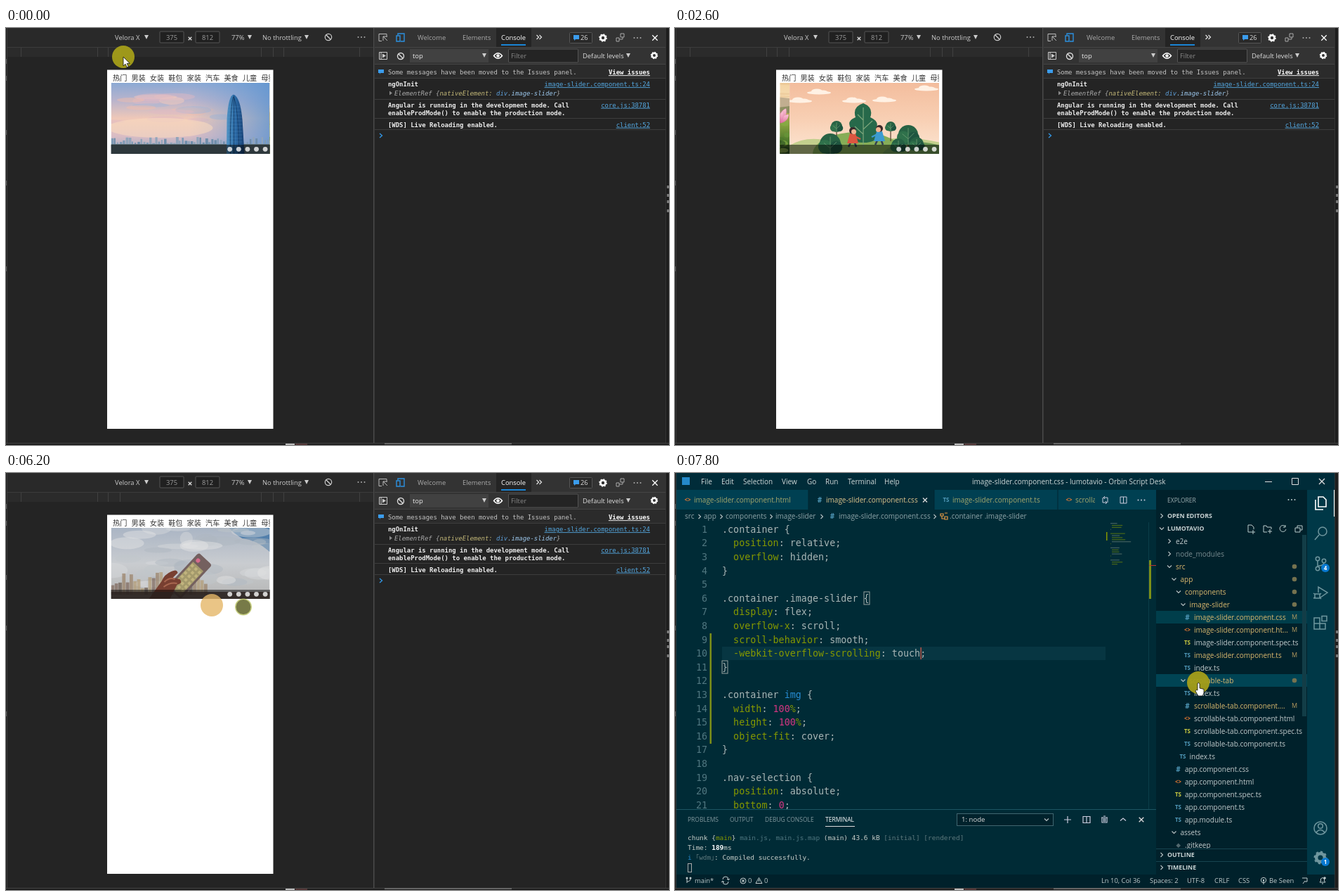
Write an HTML page that moves like this. It is 944 px wide and 593 px high and loops after 8 s.

```html
<!DOCTYPE html>
<html lang="en">
<head>
<meta charset="utf-8">
<title>Image slider</title>
<style>
html, body { margin: 0; width: 100%; height: 100%; overflow: hidden; background: #242424; }
svg { display: block; }
text { font-family: "Open Sans", "Noto Sans", sans-serif; white-space: pre; }
.mono { font-family: "DejaVu Sans Mono", monospace; }
.cjk { font-family: "Noto Sans CJK SC", "Noto Sans CJK", sans-serif; }
.b { font-weight: bold; }
.i { font-style: italic; }
.u { text-decoration: underline; }
.end { text-anchor: end; }
.mid { text-anchor: middle; }
</style>
</head>
<body>
<svg id="stage" width="944" height="593" viewBox="0 0 944 593"></svg>
<script>
const rect = (x, y, w, h, fill, more = '') => `<rect x="${x}" y="${y}" width="${w}" height="${h}" fill="${fill}" ${more}/>`;
const disc = (x, y, r, fill, more = '') => `<circle cx="${x}" cy="${y}" r="${r}" fill="${fill}" ${more}/>`;
const oval = (x, y, rx, ry, fill, more = '') => `<ellipse cx="${x}" cy="${y}" rx="${rx}" ry="${ry}" fill="${fill}" ${more}/>`;
const shape = (d, fill, more = '') => `<path d="${d}" fill="${fill}" ${more}/>`;
const line = (d, stroke = '#ccc', w = 1) => `<path d="${d}" fill="none" stroke="${stroke}" stroke-width="${w}"/>`;
const at = (x, y, body) => `<g transform="translate(${x} ${y})">${body}</g>`;
const span = (s, fill) => `<tspan fill="${fill}">${s}</tspan>`;
// y is the middle of the line of text
const text = (x, y, s, fill = '#ccc', size = 9.4, cls = '') =>
  `<text x="${x}" y="${y + size * .36}" fill="${fill}" font-size="${size}" class="${cls}">${s}</text>`;
const grad = (id, stops, dir = 'x2="0" y2="1"') => `<linearGradient id="${id}" ${dir}>` +
  stops.map((c, i) => `<stop offset="${i / (stops.length - 1)}" stop-color="${c}"/>`).join('') + '</linearGradient>';
const glow = (id, color) => `<radialGradient id="${id}"><stop stop-color="${color}"/><stop offset="1" stop-color="${color}" stop-opacity="0"/></radialGradient>`;
const many = (n, f) => Array.from({ length: n }, (_, i) => f(i)).join('');
const drop = (x, y, c = '#ccc') => shape(`M${x - 3} ${y - 3}h6l-3 6z`, c);
const cross = (x, y, r = 4, c = '#ddd') => line(`M${x - r} ${y - r}l${2 * r} ${2 * r}m0 ${-2 * r}l${-2 * r} ${2 * r}`, c, 1.3);
const gear = (x, y, r, c) => disc(x, y, r * .65, 'none', `stroke="${c}" stroke-width="${r * .5}"`) +
  disc(x, y, r * .9, 'none', `stroke="${c}" stroke-width="${r * .3}" stroke-dasharray="${r * .35}"`);
const dots3 = (x, y, c) => [-4.5, 0, 4.5].map(d => disc(x + d, y, 1, c)).join('');

let seed = 7;
const rnd = (a = 1, b = 0) => (seed = (seed * 16807) % 2147483647, b + (a - b) * seed / 2147483647);
const pick = list => list[Math.floor(rnd(list.length))];

// ---------- slides, each 226 x 101 ----------
const W = 226, H = 101;
const defs = '<defs><clipPath id="view"><path d="M149.500 78H376V179H149.500z"/></clipPath>' +
  '<clipPath id="phone"><path d="M145 60H376V179H145z"/></clipPath>' +
  `<clipPath id="slide"><path d="M0 0H${W}V${H}H0z"/></clipPath>` +
  grad('dusk', ['#8ba9d4', '#b9b4cc', '#efc8b8', '#d9bcc4', '#98abc6']) +
  grad('dayside', ['#6e9fd800', '#6e9fd800', '#5d94d0cc'], '') +
  grad('glass', ['#4f93c4', '#2a69a5', '#173f73'], '') +
  grad('dawn', ['#f3d3a2', '#fbe9c8', '#f3cf9c']) +
  grad('field', ['#b3a95a', '#7f9c3c', '#4f7a2c', '#2f5222']) +
  grad('petal', ['#f9c6d6', '#ee9cbc', '#d9689a']) +
  grad('peach', ['#f3bd9d', '#f8cfb3', '#fce6d3']) +
  grad('leaf', ['#4a8f22', '#63a52f', '#5f9f3c', '#6fa860']) +
  grad('cloud', ['#aab5c4', '#c9ccd0', '#b5b5b4']) +
  glow('sun', '#fffaf0') + glow('mist', '#dff7ea') + '</defs>';

const cloud = (x, y, c) => oval(x, y, 17, 2.5, c) + oval(x - 3, y - 2, 8, 3.5, c) + oval(x + 6, y - 1, 6, 2.5, c);

const city = rect(0, 0, W, H, 'url(#dusk)') +
  many(16, () => oval(rnd(170), rnd(60), rnd(34, 14), rnd(6, 2), pick(['#f6cdbb', '#f4bda9', '#dfb9c4', '#a4b5d5']), 'opacity=".45"')) +
  rect(0, 0, W, H, 'url(#dayside)') + oval(70, 64, 75, 14, '#fbdcc0', 'opacity=".55"') +
  many(54, i => { const h = rnd(11, 2); return rect(i * 4.2, 88 - h, rnd(4, 2), h + 4, pick(['#7f9bb6', '#6f8eab', '#91a5bb'])); }) +
  rect(0, 87, W, 14, '#5c7079') +
  shape('M164.500 101L165 52Q167 18 174.500 16.500Q184 20 187 52L190 101Z', 'url(#glass)') +
  line('M170 101Q169 42 174 20M175 101V18M182 101Q182 42 175 20', '#12355d', .8) +
  many(13, i => line(`M166 ${34 + i * 5}h21`, '#6aa6cf66', .6));

const bloom = ['M128 85C108 60 112 35 133 20C152 34 160 58 146 85Z',
  'M130 90C100 80 90 58 97 36C116 40 132 60 136 88Z',
  'M142 90C150 55 162 38 180 32C186 55 178 78 150 94Z',
  'M134 101C104 100 82 80 79 58C103 58 124 74 136 98Z',
  'M140 101C152 74 172 60 193 60C192 84 172 100 150 101Z',
  'M136 101C112 92 104 68 110 44C128 56 140 78 138 101Z',
  'M140 101C138 76 148 56 166 44C174 70 164 92 146 101Z']
  .map(d => shape(d, 'url(#petal)', 'stroke="#d9719f" stroke-width=".6"')).join('') +
  shape('M123 101Q130 78 137 70Q145 80 147 101Z', '#6f2b3c');
const lotus = rect(0, 0, W, H, 'url(#dawn)') + oval(78, 16, 95, 24, 'url(#sun)') +
  many(12, () => oval(rnd(W), rnd(20), rnd(30, 12), rnd(3, 1), '#e3b888', 'opacity=".4"')) +
  shape('M0 36Q30 28 62 33T126 26T226 22V60H0Z', '#c1ae90') + shape('M0 41Q50 35 100 39T226 33V101H0Z', '#8e8f63') +
  rect(0, 43, W, 58, 'url(#field)') + oval(35, 43, 55, 14, '#f0c164', 'opacity=".5"') +
  many(170, () => oval(rnd(W), rnd(H, 50), rnd(9, 2), rnd(5, 1.5), pick(['#84b043', '#4a7a2a', '#a9c75c', '#2c5022', '#68983a']), 'opacity=".65"')) +
  [[20, 47], [47, 43], [72, 51], [30, 62], [60, 70]].map(([x, y]) => oval(x, y, 5, 5, '#dc8eaa') + oval(x - 2, y, 2.5, 4, '#f2bccd')).join('') +
  at(167, 27, `<g transform="scale(.3)">${bloom}</g>`) + bloom;

const tree = (x, y, r, h) => line(`M${x} ${y}V${y + h}`, '#5e4936', Math.max(1.3, r / 8)) +
  disc(x, y, r, '#276244') + disc(x - r * .5, y + r * .25, r * .65, '#2f714b') + disc(x + r * .55, y + r * .3, r * .6, '#1f5540') +
  line(`M${x} ${y + r}V${y - r * .7}M${x - r * .6} ${y - r * .1}L${x} ${y + r * .4}L${x + r * .6} ${y - r * .2}`, '#78a57a', .7);
const child = (x, y, c, face) => line(`M${x - 2} ${y + 14}l-4 8m8-8l3 8`, '#344154', 2.6) +
  shape(`M${x - 4} ${y + 3}L${x + 4} ${y + 3}L${x + 8} ${y + 17}H${x - 8}Z`, c) +
  line(`M${x + face * 3} ${y + 7}l${face * 8} 4`, c, 2.4) +
  disc(x, y - 1, 5, '#3b2b2b') + disc(x + face * 1.5, y + .5, 3.5, '#f1b491');
const cartoon = rect(0, 0, W, H, 'url(#peach)') +
  [[42, 14], [92, 26], [195, 9], [135, 25], [15, 26]].map(([x, y]) => cloud(x, y, '#fff1e4')).join('') +
  shape('M0 89Q25 74 58 83T130 82T226 88V101H0Z', '#c3cf8d') +
  oval(98, 101, 65, 31, '#86ad57') + oval(181, 106, 50, 22, '#6e9b56') +
  tree(67, 62, 8, 22) + tree(144, 62, 7, 21) +
  shape('M105 29Q89 34 94 49Q80 54 88 66Q80 84 105 85Q130 85 123 66Q129 55 115 49Q120 35 105 29', '#27694a') +
  line('M105 92V35M105 73L93 62M105 66L118 54M105 53L97 45', '#7ba57a', 1.2) +
  tree(58, 87, 15, 15) + tree(169, 74, 14, 25) + tree(155, 89, 10, 10) + tree(181, 87, 10, 10) +
  child(90, 69, '#dd5640', 1) + child(128, 66, '#3c9bd1', -1);

const leaves = (n, low, colors, size) => many(n, () => oval(rnd(W), rnd(low), rnd(size, .8), rnd(size * .6, .6), pick(colors), 'opacity=".75"'));
const forest = rect(0, 0, W, H, 'url(#leaf)') +
  leaves(260, H, ['#2a5f16', '#3d8420', '#86bd35', '#b2dd55', '#1f4a14'], 6) +
  oval(130, 84, 85, 34, 'url(#mist)') + oval(150, 66, 60, 22, 'url(#mist)', 'opacity=".5"') +
  line('M8 101Q16 82 34 72T74 50T122 42T170 46T226 60', '#1d2a17', 4.5) +
  line('M0 46Q14 30 36 21T88 20T132 14T226 -4', '#1d2a17', 5) +
  line('M0 76Q22 58 46 48T84 21', '#1d2a17', 3.5) +
  line('M18 88Q52 70 88 68T150 62T226 82', '#33492a', 2.2) +
  line('M36 21Q62 36 82 33T128 42M92 20Q76 8 50 0M132 14Q160 26 184 24T226 34M122 42Q146 30 164 25M170 46Q190 38 226 46M0 12Q20 14 36 21M150 10Q168 4 176 -2', '#22331a', 2) +
  leaves(280, 62, ['#75b92d', '#a5d846', '#4b9322', '#2c6318'], 3.4);

const sky = rect(0, 0, W, H, 'url(#cloud)') + shape('M168 0H226V34Q207 17 187 15Q176 9 168 0', '#527fab') +
  many(36, () => oval(rnd(W), rnd(82), rnd(31, 8), rnd(11, 3), pick(['#d8dadb', '#aeb5bf', '#e4e5e4', '#bfc5ca']), 'opacity=".45"')) +
  many(26, i => { const h = rnd(32, 9); return rect(i * 5.3, 95 - h, 4.8, h, pick(['#9a8065', '#7e6659', '#b29a72', '#6b5a4d']), 'opacity=".7"'); }) +
  `<g transform="translate(114 66) rotate(43)">${rect(-13, -30, 26, 66, '#74605f', 'rx="4"') + rect(-10, -15, 20, 48, '#a49a6c')}` +
  many(18, i => rect(-9 + i % 3 * 7, -12 + Math.floor(i / 3) * 7, 4, 4, '#d6c78b', 'opacity=".6"')) + disc(-6, -21, 3, '#d66b8c') + '</g>' +
  shape('M54 101L72 76Q76 66 86 62Q94 58 95 64L88 71L98 73Q103 78 94 81L84 101Z', '#783f31') +
  line('M76 77Q83 70 91 73M75 84Q84 77 94 79', '#a96750', 2) +
  rect(0, 91, W, 10, '#55443e', 'opacity=".8"');

const slides = [city, lotus, cartoon, forest, sky].map((s, i) => at(i * W, 0, `<g clip-path="url(#slide)">${s}</g>`)).join('');

// ---------- browser with developer tools ----------
const dim = '#9c9c9c', blue = '#55a9e2';
const mono = (x, y, s, fill = '#d7d7d7', cls = '') => text(x, y, s, fill, 8.94, 'mono ' + cls);
const link = (y, s) => mono(917, y, s, blue, 'end u');
const field = (x, y, w, h, fill = '#202020') => rect(x, y, w, h, fill, 'stroke="#555" rx="1"');
const browser = rect(0, 0, 944, 593, '#242424') + rect(2, 0, 521, 27, '#292929') + rect(2, 28, 521, 13, '#2b2b2b') +
  line('M2 27.500H523', '#3c3c3c') + [21, 130, 145, 162, 363, 380, 395, 503].map(x => line(`M${x}.5 28V41`, '#414141')).join('') +
  text(155, 13.5, 'Velora X') + drop(200, 13) + field(219, 5, 34, 16) + text(236, 13.5, '375', dim, 9.4, 'mid') +
  cross(262, 15, 2.3) + field(270, 5, 34, 16) + text(287, 13.5, '812', dim, 9.4, 'mid') +
  text(321, 13.5, '77%') + drop(347, 13) + text(365, 13.5, 'No throttling') + drop(428, 13) +
  disc(459, 13, 4.7, 'none', 'stroke="#ccc" stroke-width="1.2"') + line('M455.500 9.500l7 7', '#ccc', 1.4) + dots3(506, 13, '#aaa') +
  rect(144, 59.5, 236.5, 510.5, '#fff') +
  `<g clip-path="url(#phone)">${['热门', '男装', '女装', '鞋包', '家装', '汽车', '美食', '儿童', '母婴'].map((s, i) => text(152 + i * 26.4, 71.5, s, '#333', 10.2, 'cjk')).join('')}</g>` +
  `<g clip-path="url(#view)"><g id="strip">${slides}</g>${rect(149, 166, 228, 13, '#000', 'opacity=".5"')}` +
  many(5, i => disc(318.7 + i * 12.6, 172.3, 3.4, '#fff', 'opacity=".78"')) + '</g>' +
  rect(523, 0, 1.5, 590, '#4a4a4a') + rect(525, 0, 414, 51, '#333') + rect(698, 0, 50, 27, '#242424') +
  line('M525 27.500H939M525 51.500H939', '#454545') + rect(705, 23, 35, 2, '#1a85d6') +
  line('M535 18.500h-4v-10h11v4M537 12l6 6m-6-6v6m0-6h6', '#bbb') +
  line('M558 10v-2h9v11h-5M556 11h5v8h-5z', '#2d91df', 1.4) +
  text(586, 13.5, 'Welcome', '#aaa') + text(650, 13.5, 'Elements', '#aaa') + text(705, 13.5, 'Console', '#fff') +
  line('M755.500 10l3 3-3 3m4-6l3 3-3 3', '#ddd', 1.3) +
  field(802.5, 6.5, 32, 15, '#292929') + shape('M808 10h8v6h-5l-2 2v-2h-1z', '#3b9cec') + text(818, 14, '26', '#ddd') +
  gear(850, 14, 5.5, '#fff') + line('M869 14h4v5h-4zM875 8h5v5h-5zM873 16h5v-3', '#aaa') + dots3(899, 14, '#aaa') + cross(924, 14, 3.7, '#fff') +
  line('M531.500 34.500h11v10h-11zM534 35v9', '#ccc') + shape('M536 36.500l5 3-5 3z', '#ccc') +
  disc(562, 40, 4.5, 'none', 'stroke="#ddd" stroke-width="1.4"') + line('M559 37l6 6', '#ddd', 1.4) +
  rect(575, 30, 112, 19, '#414141') + text(579, 40, 'top', '#eee') + drop(681, 39) +
  line('M694.500 39.500Q700.500 32 706.500 39.500Q700.500 47 694.500 39.500Z', '#fff', 1.4) + disc(700.5, 39.5, 2.3, '#fff') +
  field(715.5, 30, 99, 19, '#242424') + text(719, 40, 'Filter', '#888') + text(821, 40, 'Default levels', '#ddd') + drop(886, 39) + gear(923, 39, 5, '#fff') +
  [71, 101, 128, 144].map(y => line(`M525 ${y}.5H939`, '#3d3d3d')).join('') + rect(525, 52, 414, 19, '#2b2b2b') +
  shape('M530 59h8v5h-5l-1 2v-2h-2z', '#3b9cec') + mono(544, 63, 'Some messages have been moved to the Issues panel.', '#c4c4c4') + mono(917, 63, 'View issues', '#fff', 'end u b') +
  mono(544, 80, 'ngOnInit', '#eee', 'b') + link(80, 'image-slider.component.ts:24') +
  shape('M546 89.500l4 3-4 3z', '#888') +
  mono(553, 92.5, `ElementRef {${span('nativeElement:', '#c3b878')} ${span('div', '#5d9ed8')}${span('.image-slider', '#9cc8ed')}}`, '#aaa', 'i') +
  mono(544, 109.5, 'Angular is running in the development mode. Call', '#eee', 'b') + mono(544, 121, 'enableProdMode() to enable the production mode.', '#eee', 'b') + link(109.5, 'core.js:38781') +
  mono(544, 137.5, '[WDS] Live Reloading enabled.', '#eee', 'b') + link(137.5, 'client:52') +
  line('M532 150l3.500 3-3.500 3', '#3399e8', 1.3);

// ---------- code editor ----------
const olive = '#859900', pale = '#a8b5b5', amber = '#dcb96e';
const code = `.container {
  position: relative;
  overflow: hidden;
}

.container .image-slider {
  display: flex;
  overflow-x: scroll;
  scroll-behavior: smooth;
  -webkit-overflow-scrolling: touch;
}

.container img {
  width: 100%;
  height: 100%;
  object-fit: cover;
}

.nav-selection {
  position: absolute;
  bottom: 0;`.split('\n');
const paint = s => s.replace(/(^ +[\w-]+)|(\bimg\b)|(\d+)|%/g, (m, prop, tag, num) =>
  span(m, tag ? '#268bd2' : num ? '#d33682' : olive));
const codeRows = code.map((s, i) => {
  const y = 80 + i * 19.6;
  return text(46, y, i + 1, '#507780', 13.4, 'mono end') + text(67, y, paint(s), pale, 13.4, 'mono');
}).join('');
const minimap = code.map((s, i) => s && rect(620 + s.search(/\S/), 71 + i * 2.9, s.trim().length * .8, 1.2, i % 3 ? olive : '#7b8b80', 'opacity=".55"')).join('');

// depth, icon, name, mark
const files = `0 > e2e
0 > node_modules -
0 v src *
1 v app *
2 v components *
3 v image-slider *
4 # image-slider.component.css M
4 h image-slider.component.ht... M
4 s image-slider.component.spec.ts
4 t image-slider.component.ts M
4 t index.ts
3 v scrollable-tab *
4 t index.ts
4 # scrollable-tab.component.... M
4 h scrollable-tab.component.html
4 s scrollable-tab.component.spec.ts
4 t scrollable-tab.component.ts
3 t index.ts
2 # app.component.css
2 h app.component.html
2 s app.component.spec.ts
2 t app.component.ts
2 t app.module.ts
1 v assets
2 g .gitkeep`.split('\n');
const chevron = (x, y, open) => line(open ? `M${x - 3} ${y - 1.5}l3 3 3-3` : `M${x - 1.5} ${y - 3}l3 3-3 3`, '#b9c4c5', 1.1);
const icons = { '#': ['#', '#519aba'], h: ['&lt;&gt;', '#e37933'], s: ['TS', '#cbcb41'], t: ['TS', '#519aba'], g: ['◆', '#52686e'] };
const icon = (x, y, k) => text(x, y, ...icons[k], k === '#' ? 10 : 8, 'b mid');
const fileRows = files.map((row, i) => {
  const [depth, kind, name, mark] = row.split(' '), x = 713 + depth * 6.5, y = 97 + i * 18;
  const color = mark === '-' ? '#788b8f' : mark ? amber : '#c3cccd';
  return (icons[kind] ? icon(x - 9.5, y, kind) : chevron(x - 9, y, kind === 'v')) + text(x, y, name, color, 10) +
    (mark === 'M' ? text(882, y, 'M', '#b69b5f', 9, 'mid') : mark === '*' ? disc(882, y, 3.3, '#75724f') : '');
}).join('');
const section = (y, s, open) => chevron(693, y, open) + text(701, y, s, '#c8d2d3', 8.8, 'b');
const badge = (x, y, n) => disc(x, y, 6, '#0879d0') + text(x, y, n, '#fff', 8, 'b mid');
const ui = '#c0cbcc', idle = '#6f969e';
const ring = (x, y, r, c = idle, w = 1.5) => disc(x, y, r, 'none', `stroke="${c}" stroke-width="${w}"`);

const editor = rect(0, 0, 944, 593, '#002b36') + rect(0, 0, 940, 24, '#002c39') + rect(0, 24, 685, 28, '#004052') + rect(190, 24, 179, 28, '#002b37') +
  rect(10, 6, 11, 11, '#2489ca') +
  [[37, 'File'], [66, 'Edit'], [97, 'Selection'], [152, 'View'], [188, 'Go'], [214, 'Run'], [246, 'Terminal'], [298, 'Help']].map(([x, s]) => text(x, 12, s, '#d0d8d8', 10)).join('') +
  text(423, 12, 'image-slider.component.css - lumotavio - Orbin Script Desk', '#d0d8d8', 10) +
  line('M840 12.500h10M878.500 7.500h9v9h-9z', '#ddd') + cross(921, 12) +
  icon(18, 38, 'h') + text(27, 38.5, 'image-slider.component.html', '#a5a66c', 10) +
  icon(206, 38, '#') + text(215, 38.5, 'image-slider.component.css', '#e0c58c', 10) + cross(356, 38.5, 3) +
  icon(386, 38, 't') + text(395, 38.5, 'image-slider.component.ts', '#a5a66c', 10) +
  icon(561, 38, 'h') + text(570, 38.5, 'scrolla', '#a5a66c', 10) + rect(598, 24, 87, 28, '#004052') +
  line('M190 24V52M369 24V52M545 24V52', '#002530') +
  line('M609 35v7h6m-2-2l2 2-2 2M616 42v-7h-6m2-2l-2 2 2 2M634 34h9v9h-9zM638.500 34v9', '#ccd') + dots3(664, 38.5, '#ccd') +
  [[14, 'src'], [41, 'app'], [72, 'components'], [143, 'image-slider'], [233, 'image-slider.component.css'], [391, '.container .image-slider']].map(([x, s], i) =>
    text(x, 61.5, s, '#8fa4a8', 10) + (i ? chevron([35, 66, 137, 209, 370][i - 1], 62) : '')).join('') + icon(224, 61.5, '#') +
  line('M378 58h4v3h-4zM384 57h4M384 62h4v4h-4zM380 61v4h4', '#e69a45', 1.2) +
  rect(67, 247, 546, 19, '#073642') + rect(49.5, 228, 2.5, 157, '#7d9018') +
  rect(269, 169, 8, 18, 'none', 'stroke="#9aa3a0"') + rect(67, 267, 8, 18, 'none', 'stroke="#9aa3a0"') + codeRows + rect(349.5, 248, 1.3, 17, '#d35b4b') +
  minimap + rect(614, 84, 1.5, 12, olive) + rect(675, 124, 3, 55, '#7d9018') + rect(674, 131, 11, 1, '#b33') + line('M674.500 70V479', '#0b3d49') +
  // panel
  rect(0, 478, 685, 93, '#002b36') + line('M0 478.500H685', '#1c5563') +
  [[18, 'PROBLEMS'], [78, 'OUTPUT'], [128, 'DEBUG CONSOLE'], [214, 'TERMINAL']].map(([x, s], i) => text(x, 493, s, i > 2 ? '#fff' : '#82999f', 8.5)).join('') +
  rect(214, 502, 42, 1, '#ddd') + rect(401.5, 484.5, 137, 17, '#00222c', 'stroke="#426670"') + text(408, 493, '1: node', '#ddd', 9.6) + chevron(529, 493, true) +
  line('M554 493h10m-5-5v10M581 488.500h10v9h-10zM586 489v8M607 490h9m-8 0v7h7v-7m-5-2h3m-2.500 3v5m2 0v-5M634 494.500l4-3.500 4 3.500', '#ccd', 1.2) + cross(664, 493, 3.3) +
  text(18, 519, `chunk {${span('main', olive)}} ${span('main.js, main.js.map', '#4f7780')} (main) 43.6 kB ${span('[initial] [rendered]', '#5e797d')}`, '#c9cfca', 9.48, 'mono') +
  text(18, 533, `Time: <tspan class="b" fill="#fff">189</tspan>ms`, '#c9cfca', 9.48, 'mono') +
  text(18, 547, `${span('i', '#268bd2')} ${span('｢wdm｣', '#5e797d')}: Compiled successfully.`, '#c9cfca', 9.48, 'mono') + rect(18.5, 555.5, 5, 12, 'none', 'stroke="#aaa"') +
  // sidebar
  rect(685, 24, 215, 547, '#00212b') + text(701, 38.5, 'EXPLORER', '#9eafb2', 8.5) + dots3(878, 38, '#bcc') +
  rect(685, 196, 215, 18, '#003e4b') + '<g id="hover">' + rect(685, 286, 215, 18, '#004454') + '</g>' + rect(893, 88, 6, 258, '#123d47') +
  section(61, 'OPEN EDITORS') + section(79, 'LUMOTAVIO', true) +
  line('M816 74h5l3 3v3M816 74v10h4M823 81v6m-3-3h6M838 84v-9h4l1 2h6v3M838 84h5M847 80v6m-3-3h6M869 76a4.500 4.500 0 1 0 1 4m-1-6v3h-3M883 78h7v6h-7zM886 78v-3h7v6h-3', '#bcc') +
  fileRows + rect(685, 534, 215, 37, '#00212b') + line('M685 534.500H900M685 552.500H900', '#174450') + section(543, 'OUTLINE') + section(561, 'TIMELINE') +
  // activity bar
  rect(900, 24, 40, 547, '#003847') + rect(938, 24, 1.5, 38, '#fff') +
  line('M916 34h7l4 4v10h-11zM912 38v14h11', '#fff', 1.6) +
  line('M917 88l-6 7', idle, 1.6) + ring(922, 83, 6) +
  ring(915, 122, 2.7) + ring(915, 136, 2.7) + ring(924, 125, 2.7) + line('M915 125v8M924 128q-1 4-8 4', idle, 1.5) + badge(926, 135, 4) +
  line('M916 170v-8l13 8-10 7M911 172h7v6h-7zM909 171l3 2m-3 5l3-1m6-4l2-2m-2 6l2 2', idle, 1.5) +
  line('M910 206h8v16h-8zM918 214h8v8h-8M910 214h8M921 203.500h7v7h-7z', idle, 1.5) +
  ring(919, 505, 9) + ring(919, 502, 3.3) + line('M913 511q6-7 12 0', idle, 1.5) +
  gear(919, 547, 9, idle) + badge(926, 553, 1) +
  // status bar
  rect(0, 571, 940, 20, '#00212b') + line('M17 576v7M17 581q5 0 5-4', ui) + disc(17, 576, 1.5, ui) + disc(22, 576, 1.5, ui) + text(28, 580, 'main*', ui) +
  line('M68 578a4 4 0 0 1 8 0m-2-1l2 2 2-2M76 581a4 4 0 0 1-8 0m-2 1l2-2 2 2', ui) +
  ring(97, 580, 4, ui, 1) + cross(97, 580, 1.6, ui) + text(104, 580, '0', ui) + line('M119.500 575.500l4.500 8h-9zM119.500 578v3', ui) + text(127, 580, '0', ui) +
  [[607, 'Ln 10, Col 36'], [676, 'Spaces: 2'], [729, 'UTF-8'], [768, 'CRLF'], [802, 'CSS'], [846, 'Be Seen']].map(([x, s]) => text(x, 580, s, ui)).join('') +
  ring(838, 579, 3.7, ui, 1) + disc(838, 579, 1.2, ui) + line('M838 580v5M894 584l3-4m-4-4h7v5h-3M918 582h8l-1.500-2v-3q-2.500-3-5 0v3zM921 584h2', ui) + disc(925, 576, 1.8, ui);

const edges = rect(0, 0, 1.5, 593, '#1b1b1b') + line('M1.500 0V590', '#414141', .8) + rect(940, 0, 4, 593, '#1d1d1d') + line('M939.500 0V590', '#383838', .8) +
  [48, 72, 149, 221, 343].map(y => line(`M0 ${y - 4}v7`, '#777', 1.3)).join('') + [226, 238, 247, 260].map(y => rect(941, y - 2, 3, 4, '#777')).join('') +
  rect(0, 590, 944, 3, '#1d1d1d') + line('M0 590.500H944', '#444') + rect(398, 591, 13, 2, '#bbb') + rect(412, 591, 17, 2, '#503434') + rect(539, 590, 181, 2, '#656565');

// ---------- pointers ----------
const halo = disc(0, 0, 16, '#a49e19', 'opacity=".95"');
const outline = 'stroke="#111" stroke-width=".8"';
const arrow = halo + shape('M0 0V13L3 10.200L5.200 14.800L7.300 13.800L5.200 9.400H9.200Z', '#fff', outline);
const hand = halo + shape('M-1 1Q1 -1 2 2V8L8 9.500V15L6 19H0L-4 12Q-3 9 -1 11Z', '#fff', outline);
const touch = (gap = 3) => disc(0, 0, 16, '#e5b668', 'opacity=".8"') + disc(gap, 2.5, 12, '#b3bd58', 'opacity=".75"') + disc(gap, 2.5, 10.5, '#777a48');

const stage = document.getElementById('stage');
stage.innerHTML = defs + `<g id="browser">${browser}</g><g id="editor">${editor}</g>${edges}<g id="pointer"></g>`;
const el = Object.fromEntries(['strip', 'browser', 'editor', 'hover', 'pointer'].map(id => [id, document.getElementById(id)]));

// [time, slides scrolled]
const scrolls = [[0, 0], [600, .55], [800, .975], [1000, 1], [1200, 1.08], [1400, 1.3], [1600, 1.45], [2600, 1.94], [2800, 2],
  [3200, 2.2], [3400, 2.465], [4600, 2.8], [4800, 3], [5000, 3.07], [5200, 3.6], [5400, 4]];
// [time, look, x, y]
const pointers = [[0, arrow, 167, 41], [200, touch(), 357, 188], [400, ''], [3800, touch(), 331, 189], [4400, ''],
  [6200, touch(45), 293, 188], [6600, arrow, 928, 222], [6800, ''], [7600, arrow, 905, 225], [7800, hand, 745, 298]];
const now = (steps, t) => steps.findLast(s => s[0] <= t);

let shown;
function draw() {
  requestAnimationFrame(draw);
  const t = Math.floor(performance.now() % 8000 / 200) * 200, coding = t >= 7600;
  if (t === shown) return;
  shown = t;
  const [, look, x = 0, y = 0] = now(pointers, t);
  el.strip.setAttribute('transform', `translate(${149.5 - now(scrolls, t)[1] * W} 78)`);
  el.browser.style.display = coding ? 'none' : '';
  el.editor.style.display = coding ? '' : 'none';
  el.hover.style.display = t >= 7800 ? '' : 'none';
  el.pointer.innerHTML = look && at(x, y, look);
}
draw();
</script>
</body>
</html>
```
